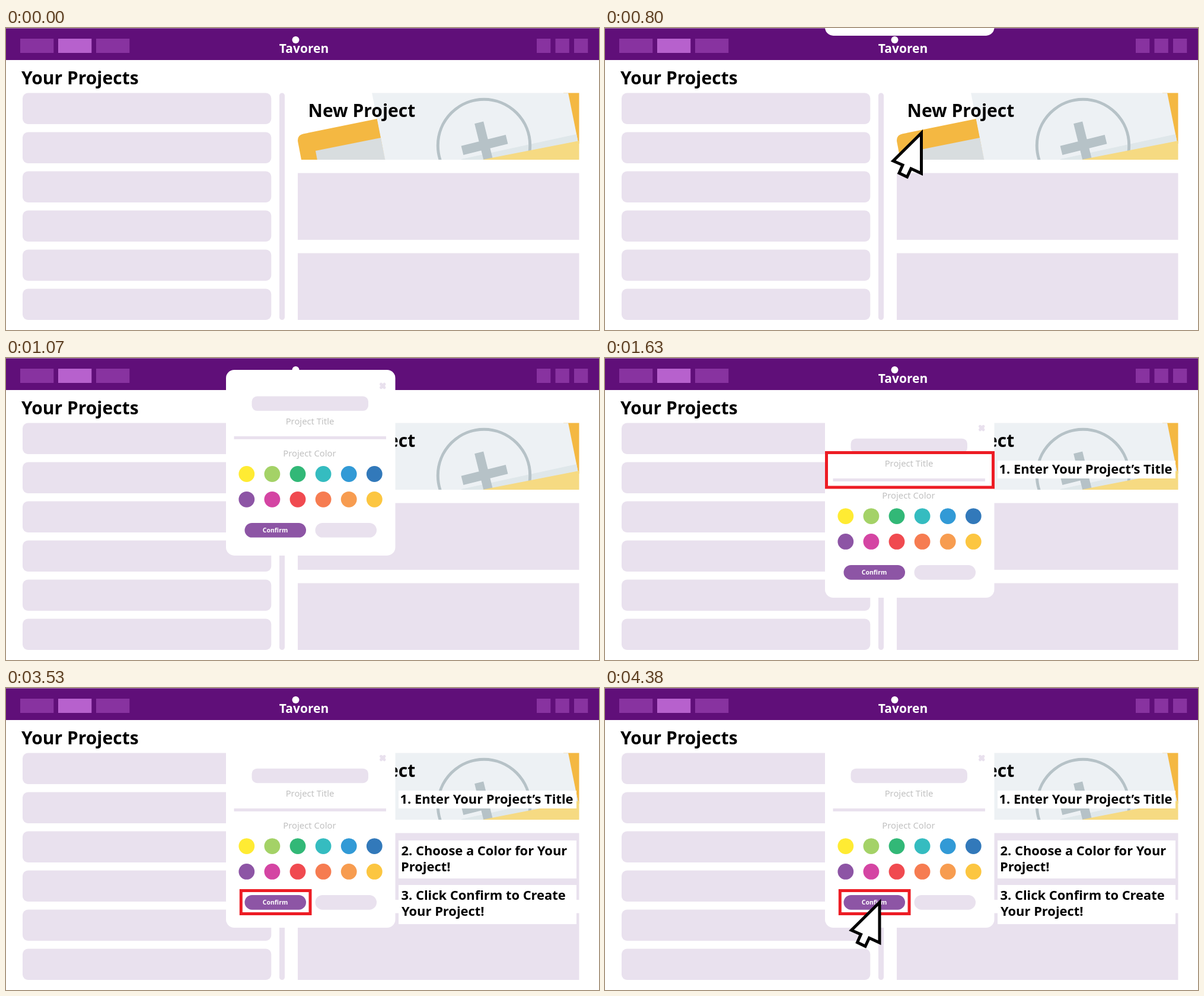
Animation of 1000 by 509 pixels, one loop 5480 ms. Source, as an HTML page:

```html
<!DOCTYPE html>
<html lang="en">
<head>
<meta charset="utf-8">
<title>Create a project</title>
<style>
  html, body { margin: 0; height: 100%; overflow: hidden; background: #fff; }
  svg { display: block; width: 1000px; height: 509px; }
  text { font-family: "Noto Sans", "Open Sans", sans-serif; font-weight: 700; }
  .heading { font-size: 30px; }
  .step { font-size: 21.9px; }
  .caption { font-size: 14.8px; font-weight: 400; fill: #c1c1c1; text-anchor: middle; }
  .soft { fill: #e9e1ee; }
  .frame { fill: none; stroke: #ed1c24; stroke-width: 5; }
</style>
</head>
<body>
<svg viewBox="0 0 1000 509">
  <defs>
    <clipPath id="cardClip"><rect x="492" y="109.5" width="474.5" height="112.5"/></clipPath>
    <path id="arrow" d="M533.5 177L486 224L502 231L496 244.5L509.5 251L516 237L533.5 245Z"
      fill="#fff" stroke="#000" stroke-width="5" stroke-miterlimit="10"/>
  </defs>

  <rect width="1000" height="54" fill="#600f79"/>
  <rect width="1000" height="1" fill="#a277b0"/>
  <g id="nav"></g>
  <circle cx="488.5" cy="20" r="6" fill="#fff"/>
  <text x="502.5" y="42" font-size="21" fill="#fff" text-anchor="middle">Tavoren</text>

  <text class="heading" x="26" y="95">Your Projects</text>
  <g id="list" class="soft">
    <rect x="461" y="109.5" width="9" height="382.5" rx="4.5"/>
    <rect x="492" y="244.5" width="474.5" height="112.5"/>
    <rect x="492" y="379.5" width="474.5" height="112.5"/>
  </g>

  <g clip-path="url(#cardClip)">
    <path d="M498 222L492.3 192Q490.500 181 501 178.500L626 153L640 222ZM940 109H967V195H940Z" fill="#f4b842"/>
    <path d="M522 207L632 185L640 223H525Z" fill="#d8dddf"/>
    <path d="M617 109H948L964.5 191L803 223H639.500Z" fill="#edf1f4"/>
    <path d="M768 221L962 179L964.500 191L803 223H768Z" fill="#dfe7ea"/>
    <g fill="none" stroke="#b6c2c7">
      <circle cx="806" cy="198" r="77.7" stroke-width="5"/>
      <path d="M-38.7 0H38.7M0 -38.7V38.700" stroke-width="15.5" transform="translate(807 197) rotate(-14)"/>
    </g>
    <path d="M803 222L967 190V223H803Z" fill="#f6da82"/>
  </g>
  <text class="heading" x="509.500" y="150">New Project</text>

  <use id="firstCursor" href="#arrow"/>

  <g id="dialog">
    <rect x="371" y="91" width="285.500" height="313" rx="14" fill="#fff"/>
    <path d="M632.500 115.300L638 120.800M638 115.300L632.500 120.800" stroke="#e9e1ee" stroke-width="5" stroke-linecap="round"/>
    <g class="soft">
      <rect x="414.500" y="135.700" width="196.500" height="24.500" rx="9"/>
      <rect x="384.500" y="203" width="256.500" height="5"/>
      <rect x="521.500" y="349" width="103.500" height="24.700" rx="12.300"/>
    </g>
    <text class="caption" x="512.500" y="183">Project Title</text>
    <text class="caption" x="512" y="237">Project Color</text>
    <g id="swatches"></g>
    <rect x="402.500" y="349" width="103.500" height="24.700" rx="12.300" fill="#8d55a5"/>
    <text x="454" y="365" font-size="10.5" fill="#fff" text-anchor="middle">Confirm</text>
  </g>

  <g id="labels" class="step">
    <g>
      <rect x="662" y="173" width="300" height="30" fill="#fff"/>
      <text x="664.500" y="195">1. Enter Your Project’s Title</text>
    </g>
    <g>
      <rect x="662" y="257" width="300" height="64" fill="#fff"/>
      <text x="666.500" y="282">2. Choose a Color for Your</text>
      <text x="666" y="309">Project!</text>
    </g>
    <g>
      <rect x="662" y="332" width="300" height="66" fill="#fff"/>
      <text x="666.500" y="357">3. Click Confirm to Create</text>
      <text x="667" y="384">Your Project!</text>
    </g>
  </g>
  <g id="frames" class="frame">
    <rect x="373.500" y="159.500" width="281" height="58.500"/>
    <rect x="373.500" y="214.500" width="281" height="123.500"/>
    <rect x="396.300" y="341.500" width="116.700" height="39"/>
  </g>

  <use id="secondCursor" href="#arrow"/>
</svg>
<script>
  const LOOP = 5480, TICK = 30;
  const STEP_TIMES = [1630, 2530, 3530, LOOP];
  const byId = id => document.getElementById(id);

  function add(parent, tag, attrs) {
    const node = document.createElementNS('http://www.w3.org/2000/svg', tag);
    for (const key in attrs) node.setAttribute(key, attrs[key]);
    byId(parent).append(node);
  }

  [24, 88, 152].forEach((x, i) =>
    add('nav', 'rect', { x, y: 18, width: 56.3, height: 24, fill: i === 1 ? '#b761cd' : '#8833a0' }));
  [895, 926.5, 958].forEach(x =>
    add('nav', 'rect', { x, y: 18, width: 23.3, height: 24, fill: '#8833a0' }));
  for (let i = 0; i < 6; i++)
    add('list', 'rect', { x: 28, y: 109.5 + 66 * i, width: 419.3, height: 52.5, rx: 9 });

  const colors = ['#ffeb33', '#a4d267', '#32b877', '#35bcc0', '#329ad6', '#3279ba',
                  '#8d55a5', '#d445a3', '#f04a50', '#f67c51', '#f79c50', '#fcc641'];
  colors.forEach((fill, i) =>
    add('swatches', 'circle', { cx: 405.8 + 43.1 * (i % 6), cy: i < 6 ? 266.6 : 309.4, r: 13.4, fill }));

  // Ticks still to go before a move ends; one extra tick keeps it off stage beforehand.
  const ticksLeft = (t, start, count) =>
    count - Math.max(-1, Math.min(count, Math.floor((t - start) / TICK)));
  const move = (id, x, y) => byId(id).setAttribute('transform', `translate(${x} ${y})`);
  const show = (node, on) => node.setAttribute('visibility', on ? 'visible' : 'hidden');

  function draw(t) {
    const first = ticksLeft(t, 30, 10);
    const drop = ticksLeft(t, 800, 11);
    const second = ticksLeft(t, 3960, 14);
    move('firstCursor', -38.9 * first, 32.2 * first);
    move('dialog', 0, -35.55 * drop);
    move('secondCursor', -70.5 + 11.5 * second, 184.3 - 30.3 * second);
    for (let i = 0; i < 3; i++) {
      show(byId('labels').children[i], t >= STEP_TIMES[i]);
      show(byId('frames').children[i], t >= STEP_TIMES[i] && t < STEP_TIMES[i + 1]);
    }
  }

  const began = performance.now();
  function tick() {
    draw((performance.now() - began) % LOOP);
    requestAnimationFrame(tick);
  }
  tick();
</script>
</body>
</html>
```
